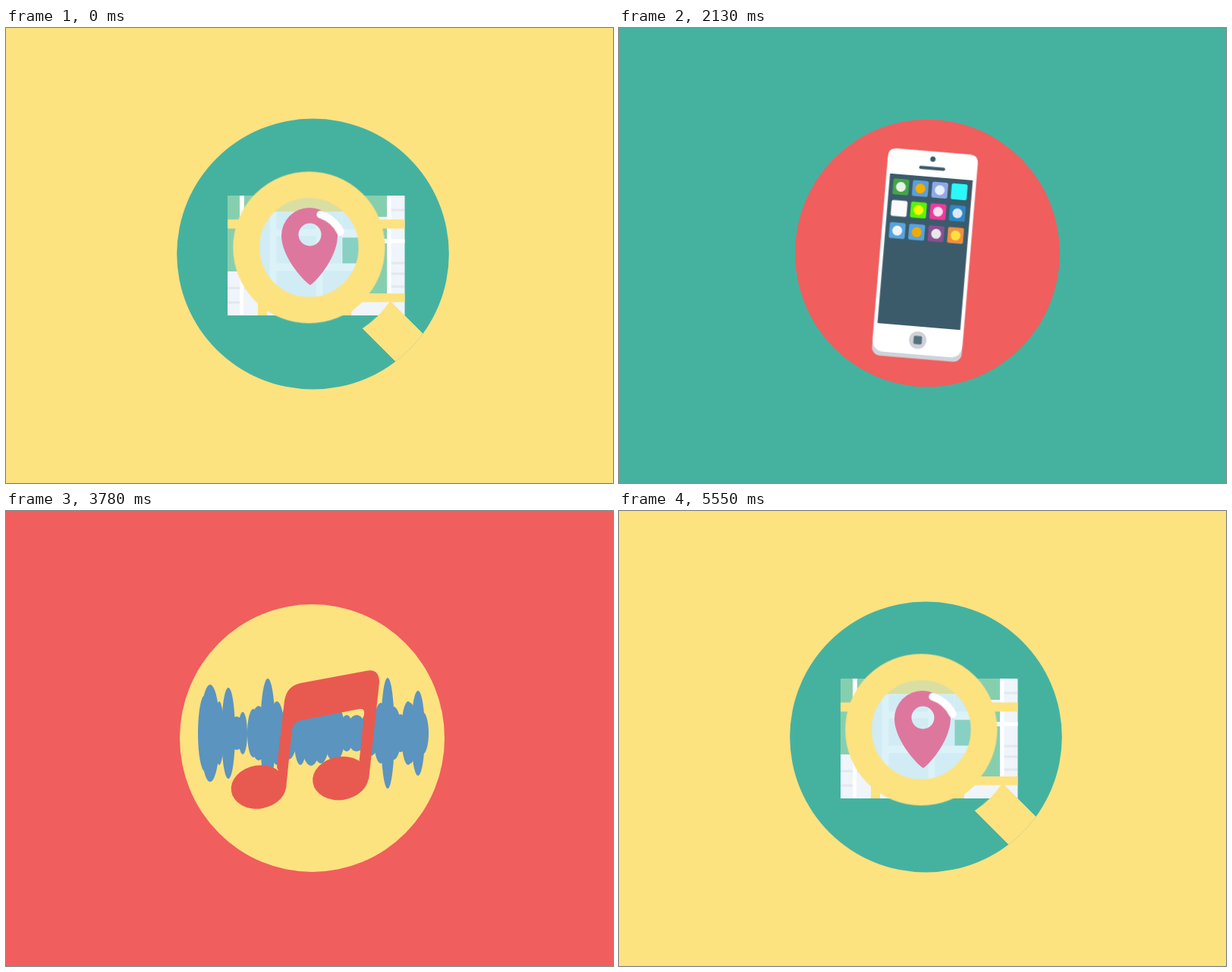
These frames come from a looping animation (800x600 px, 5.58 s). An HTML page without scripts:

```html
<!DOCTYPE html>
<html lang="en">
<head>
<meta charset="utf-8">
<title>Icon loop</title>
<style>
html, body { margin: 0; width: 100%; height: 100%; overflow: hidden; background: #fde280; }
svg { display: block; width: 800px; height: 600px; }

.loop, .wave ellipse, .icon { animation: 5580ms linear infinite both; }
.teal { fill: #45b2a0; }
.red { fill: #f05e5e; }
.yellow { fill: #fde280; }
.at-map { transform-origin: 404.5px 298px; }
.at-phone { transform-origin: 406.5px 297px; }
.at-note { transform-origin: 403.5px 299.5px; }

/* Discs pop in, rest, then flood the stage as the next backdrop */
.teal-disc { animation-name: teal-disc; }
@keyframes teal-disc {
  0%, 10.22% { transform: scale(1); animation-timing-function: ease-in; }
  13.44%, 75.26% { transform: scale(3.1); }
  75.27% { transform: scale(0); animation-timing-function: ease-out; }
  77.1% { transform: scale(1.06); animation-timing-function: ease-in-out; }
  79.3%, 100% { transform: scale(1); }
}
.red-disc { animation-name: red-disc; }
@keyframes red-disc {
  0%, 13.2% { transform: scale(0); animation-timing-function: ease-out; }
  15.6% { transform: scale(1.06); animation-timing-function: ease-in-out; }
  18.5%, 40.86% { transform: scale(1); animation-timing-function: ease-in; }
  44.1%, 75.26% { transform: scale(3.1); }
  75.27%, 100% { transform: scale(0); }
}
.yellow-disc { animation-name: yellow-disc; }
@keyframes yellow-disc {
  0%, 43.9% { transform: scale(0); animation-timing-function: ease-out; }
  46.2% { transform: scale(1.06); animation-timing-function: ease-in-out; }
  49.2%, 71.5% { transform: scale(1); animation-timing-function: ease-in; }
  74.73%, 75.26% { transform: scale(3.1); }
  75.27%, 100% { transform: scale(0); }
}

/* Contents follow the pop and shrink away at the flood */
.map-scene { animation-name: map-scene; }
@keyframes map-scene {
  0%, 10.22% { transform: scale(1); animation-timing-function: ease-in; }
  12.9%, 79.9% { transform: scale(0); }
  80%, 100% { transform: scale(1); }
}
.phone-scene { animation-name: phone-scene; }
@keyframes phone-scene {
  0%, 13.2% { transform: scale(0); animation-timing-function: ease-out; }
  15.6% { transform: scale(1.06); animation-timing-function: ease-in-out; }
  18.5%, 40.86% { transform: scale(1); animation-timing-function: ease-in; }
  43.5%, 100% { transform: scale(0); }
}
.note-scene { animation-name: note-scene; }
@keyframes note-scene {
  0%, 43.9% { transform: scale(0); animation-timing-function: ease-out; }
  46.2% { transform: scale(1.06); animation-timing-function: ease-in-out; }
  49.2%, 71.5% { transform: scale(1); animation-timing-function: ease-in; }
  74.2%, 100% { transform: scale(0); }
}

.phone { animation-name: phone; }
@keyframes phone {
  0%, 13.2% { transform: translate(190px, 300px) rotate(-48deg); }
  15.6% { transform: translate(334.5px, 296px) rotate(-13.3deg); animation-timing-function: ease-out; }
  21.5% { transform: translate(433px, 299px) rotate(11deg); animation-timing-function: ease-in-out; }
  29.9%, 100% { transform: translate(403.5px, 295px) rotate(4.8deg); }
}
.icon { translate: var(--x) var(--y); animation-name: icon; animation-delay: calc(var(--i) * 29ms); }
@keyframes icon {
  0%, 30.3% { scale: 0; animation-timing-function: ease-out; }
  32%, 60% { scale: 1; }
  60.1%, 100% { scale: 0; }
}

/* --a and --b are two poses of each lobe; the rest are blends */
.wave ellipse { transform-origin: 0 293px; animation-name: wave; }
@keyframes wave {
  0%, 46.5% { transform: scaleY(.04); }
  51.08% { transform: scaleY(calc(var(--b) * .8)); }
  53.23% { transform: scaleY(calc(var(--a) * .4 + var(--b) * .5)); }
  55.38%, 55.9% { transform: scaleY(var(--a)); }
  57% { transform: scaleY(calc(var(--a) * .3 + var(--b) * .6)); }
  59.14% { transform: scaleY(calc(var(--a) * 1.14)); }
  61.29% { transform: scaleY(calc(var(--b) * .8)); }
  63.44% { transform: scaleY(calc(var(--a) * .5 + var(--b) * .2)); }
  65.59% { transform: scaleY(calc(var(--a) * .9)); }
  67.74%, 68.27% { transform: scaleY(var(--b)); }
  69.35% { transform: scaleY(calc(var(--a) * .6 + var(--b) * .2)); }
  71.5%, 100% { transform: scaleY(calc(var(--b) * .7)); }
}

.map { transform-origin: 525.5px 0; animation-name: map; }
@keyframes map {
  0%, 12.9% { transform: scaleX(1); }
  12.91%, 80.1% { transform: scaleX(0); }
  80.64%, 81% { transform: scaleX(.008); animation-timing-function: cubic-bezier(.4, 0, .2, 1); }
  86%, 100% { transform: scaleX(1); }
}
.pin { transform-origin: 401px 339px; animation-name: pin; }
@keyframes pin {
  0%, 12.9% { transform: scale(1); }
  12.91%, 85.2% { transform: scale(0); animation-timing-function: ease-out; }
  87.6% { transform: scale(1.15); animation-timing-function: ease-in-out; }
  89.3%, 100% { transform: scale(1); }
}
.glass { animation-name: glass; }
@keyframes glass {
  0% { transform: translate(399.3px, 289.3px); }
  .538%, 12.9% { transform: translate(400.3px, 290.3px); }
  12.91%, 86.8% { transform: translate(630px, 520px); animation-timing-function: cubic-bezier(.2, .4, .6, .9); }
  91.4% { transform: translate(390.3px, 280.3px); animation-timing-function: ease-out; }
  93.6% { transform: translate(378.3px, 269.3px); animation-timing-function: cubic-bezier(.4, 0, .7, .9); }
  99.46% { transform: translate(398.3px, 288.3px); }
  100% { transform: translate(399.3px, 289.3px); }
}
</style>
</head>
<body>
<svg viewBox="0 0 800 600">
  <defs>
    <clipPath id="map-clip"><ellipse cx="404.5" cy="298" rx="179.3" ry="178.5"/></clipPath>
    <clipPath id="phone-clip"><ellipse cx="406.5" cy="297" rx="174.5" ry="176.3"/></clipPath>
    <clipPath id="lens-clip"><circle r="67"/></clipPath>
    <rect id="tile" x="-10.5" y="-10.5" width="21" height="21" rx="2.5"/>
    <circle id="dot" r="6.5"/>
  </defs>
  <rect class="yellow" width="800" height="600"/>

  <!-- Map -->
  <ellipse class="loop at-map teal teal-disc" cx="404.5" cy="298" rx="179.3" ry="178.5"/>
  <g clip-path="url(#map-clip)">
    <g class="loop at-map map-scene">
      <g class="loop map">
        <path fill="#eff5fa" d="M292 221h233.5v158H292z"/>
        <path fill="#86cfae" d="M292 221h16v32h-16zM314 221h188v28H314zM292 264h16v57h-16zM314 264h80v48h-80zM404 264h98v14h-98zM404 284h98v66h-98z"/>
        <path fill="none" stroke="#e2e8ee" stroke-width="3" d="M292 343h16M314 343h18M508 240h17M508 281h17M508 310h17M508 324h17M508 341h17M344 330h110M292 362h16"/>
        <path fill="none" stroke="#fff" stroke-width="5" d="M310.5 221v158M502 281h23.5M505 221v158"/>
        <path class="yellow" d="M292 252.5h233.5v12H292zM332 350h193.5v11.5H332zM332 350h12v29h-12zM440 361h30l-15 13v5h-15z"/>
      </g>
      <g class="loop glass">
        <g clip-path="url(#lens-clip)">
          <circle r="67" fill="#dcf2f9"/>
          <path fill="#d1ecf4" d="M-67-46h15v106h-15zM-43-46h52v22h-52zM-43-15h52v36h-52zM-43 31h52v36h-52zM18-46h25v22H18zM18-15h25v36H18zM18 31h49v36H18zM44-46h23v22H44z"/>
          <path fill="#d9dfa2" d="M-67-67H67v20H-67z"/>
          <path fill="#88d0c4" d="M44-13h24v34H44z"/>
        </g>
      </g>
      <path class="loop pin" fill="#de779e" fill-rule="evenodd" d="M401 339C390 332 363 300 363 274A37 37 0 0 1 437 274C437 300 412 332 401 339ZM385.5 272.5a15 15 0 1 0 30 0a15 15 0 1 0-30 0Z"/>
      <g class="loop glass">
        <circle r="82.7" fill="none" stroke="#fde280" stroke-width="34.8"/>
        <path class="yellow" transform="rotate(45)" d="M125.3-26A128 128 0 0 1 125.3 26H280V-26Z"/>
        <path fill="none" stroke="#fff" stroke-width="10" stroke-linecap="round" d="M15-43.5A46 46 0 0 1 41.5-20.5"/>
      </g>
    </g>
  </g>

  <!-- Phone -->
  <ellipse class="loop at-phone red red-disc" cx="406.5" cy="297" rx="174.5" ry="176.3"/>
  <g class="loop at-phone phone-scene" clip-path="url(#phone-clip)">
    <g class="loop phone">
      <rect x="-59.3" y="-132.5" width="118.6" height="274" rx="11" fill="#cfd3da"/>
      <path fill="#fff" d="M-59.3-121.5q0-11 11-11h96.6q11 0 11 11V120q-1 16-16 16h-86.6q-15 0-16-16z"/>
      <rect x="-54.7" y="-99" width="109.4" height="198" fill="#3b5b6b"/>
      <circle cy="-122.4" r="3.5" fill="#3b5b6b"/>
      <path stroke="#3b5b6b" stroke-width="4.4" stroke-linecap="round" d="M-15-110.4h30"/>
      <circle cy="117" r="11.5" fill="#cfd1d6"/>
      <rect x="-5.5" y="111.5" width="11" height="11" rx="2" fill="#56707f"/>
      <g style="--y:-82.5px">
        <g class="icon" style="--i:0;--x:-39px"><use href="#tile" fill="#45a34a"/><use href="#dot" fill="#e8f3e8"/></g>
        <g class="icon" style="--i:1;--x:-13.3px"><use href="#tile" fill="#5b9fd8"/><use href="#dot" fill="#f5b000"/></g>
        <g class="icon" style="--i:2;--x:12.4px"><use href="#tile" fill="#8fa8e8"/><use href="#dot" fill="#e8f0f8"/></g>
        <g class="icon" style="--i:3;--x:38.1px"><use href="#tile" fill="#2cf8f8"/></g>
      </g>
      <g style="--y:-54px">
        <g class="icon" style="--i:4;--x:-39px"><use href="#tile" fill="#fafaff"/></g>
        <g class="icon" style="--i:5;--x:-13.3px"><use href="#tile" fill="#55f508"/><use href="#dot" fill="#f5f800"/></g>
        <g class="icon" style="--i:6;--x:12.4px"><use href="#tile" fill="#f2389e"/><use href="#dot" fill="#f6e2ea"/></g>
        <g class="icon" style="--i:7;--x:38.1px"><use href="#tile" fill="#2d87c8"/><use href="#dot" fill="#dfe9f5"/></g>
      </g>
      <g style="--y:-24.7px">
        <g class="icon" style="--i:8;--x:-39px"><use href="#tile" fill="#58a4dc"/><use href="#dot" fill="#eef4fc"/></g>
        <g class="icon" style="--i:9;--x:-13.3px"><use href="#tile" fill="#58a4dc"/><use href="#dot" fill="#f5a900"/></g>
        <g class="icon" style="--i:10;--x:12.4px"><use href="#tile" fill="#8a4f94"/><use href="#dot" fill="#e8e8e8"/></g>
        <g class="icon" style="--i:11;--x:38.1px"><use href="#tile" fill="#f09040"/><use href="#dot" fill="#ffe040"/></g>
      </g>
    </g>
  </g>

  <!-- Music -->
  <ellipse class="loop at-note yellow yellow-disc" cx="403.5" cy="299.5" rx="174.5" ry="176.5"/>
  <g class="loop at-note note-scene">
    <g class="wave" fill="#5b94bf">
      <ellipse cx="262" cy="293" rx="9" ry="100" style="--a:.25;--b:.5"/>
      <ellipse cx="269" cy="293" rx="13" ry="100" style="--a:.37;--b:.64"/>
      <ellipse cx="281" cy="293" rx="6" ry="100" style="--a:.52;--b:.42"/>
      <ellipse cx="293" cy="293" rx="9" ry="100" style="--a:.77;--b:.6"/>
      <ellipse cx="304" cy="293" rx="11" ry="100" style="--a:.02;--b:.22"/>
      <ellipse cx="312" cy="293" rx="6" ry="100" style="--a:.11;--b:.28"/>
      <ellipse cx="326" cy="293" rx="8" ry="100" style="--a:.12;--b:.32"/>
      <ellipse cx="333" cy="293" rx="11" ry="100" style="--a:.12;--b:.36"/>
      <ellipse cx="345" cy="293" rx="10" ry="100" style="--a:.5;--b:.72"/>
      <ellipse cx="357" cy="293" rx="10" ry="100" style="--a:.4;--b:.42"/>
      <ellipse cx="372" cy="293" rx="12" ry="100" style="--a:.45;--b:.35"/>
      <ellipse cx="388" cy="293" rx="9" ry="100" style="--a:.82;--b:.42"/>
      <ellipse cx="402" cy="293" rx="14" ry="100" style="--a:.24;--b:.43"/>
      <ellipse cx="415" cy="293" rx="12" ry="100" style="--a:.45;--b:.4"/>
      <ellipse cx="433" cy="293" rx="14" ry="100" style="--a:.16;--b:.38"/>
      <ellipse cx="449" cy="293" rx="9" ry="100" style="--a:1.06;--b:.24"/>
      <ellipse cx="462" cy="293" rx="13" ry="100" style="--a:.5;--b:.24"/>
      <ellipse cx="480" cy="293" rx="13" ry="100" style="--a:.3;--b:.3"/>
      <ellipse cx="494" cy="293" rx="10" ry="100" style="--a:.3;--b:.4"/>
      <ellipse cx="503" cy="293" rx="9" ry="100" style="--a:.25;--b:.73"/>
      <ellipse cx="511" cy="293" rx="10" ry="100" style="--a:.65;--b:.35"/>
      <ellipse cx="520" cy="293" rx="9" ry="100" style="--a:.3;--b:.25"/>
      <ellipse cx="530" cy="293" rx="9" ry="100" style="--a:.4;--b:.42"/>
      <ellipse cx="533" cy="293" rx="8" ry="100" style="--a:.82;--b:.4"/>
      <ellipse cx="543" cy="293" rx="9" ry="100" style="--a:.42;--b:.56"/>
      <ellipse cx="549" cy="293" rx="8" ry="100" style="--a:.15;--b:.28"/>
    </g>
    <g fill="#e85a50">
      <path d="M357 338L367 250Q370 231 388 227L474 211Q492 207 492 226L478 355L465 335L472 268Q473 260 466 261L389 276Q379 278 377 288L369 366Z"/>
      <ellipse cx="333" cy="364" rx="36.5" ry="28.5" transform="rotate(-9 333 364)"/>
      <ellipse cx="441" cy="352.5" rx="37" ry="28.5" transform="rotate(-9 441 352.5)"/>
    </g>
  </g>
</svg>
</body>
</html>
```
